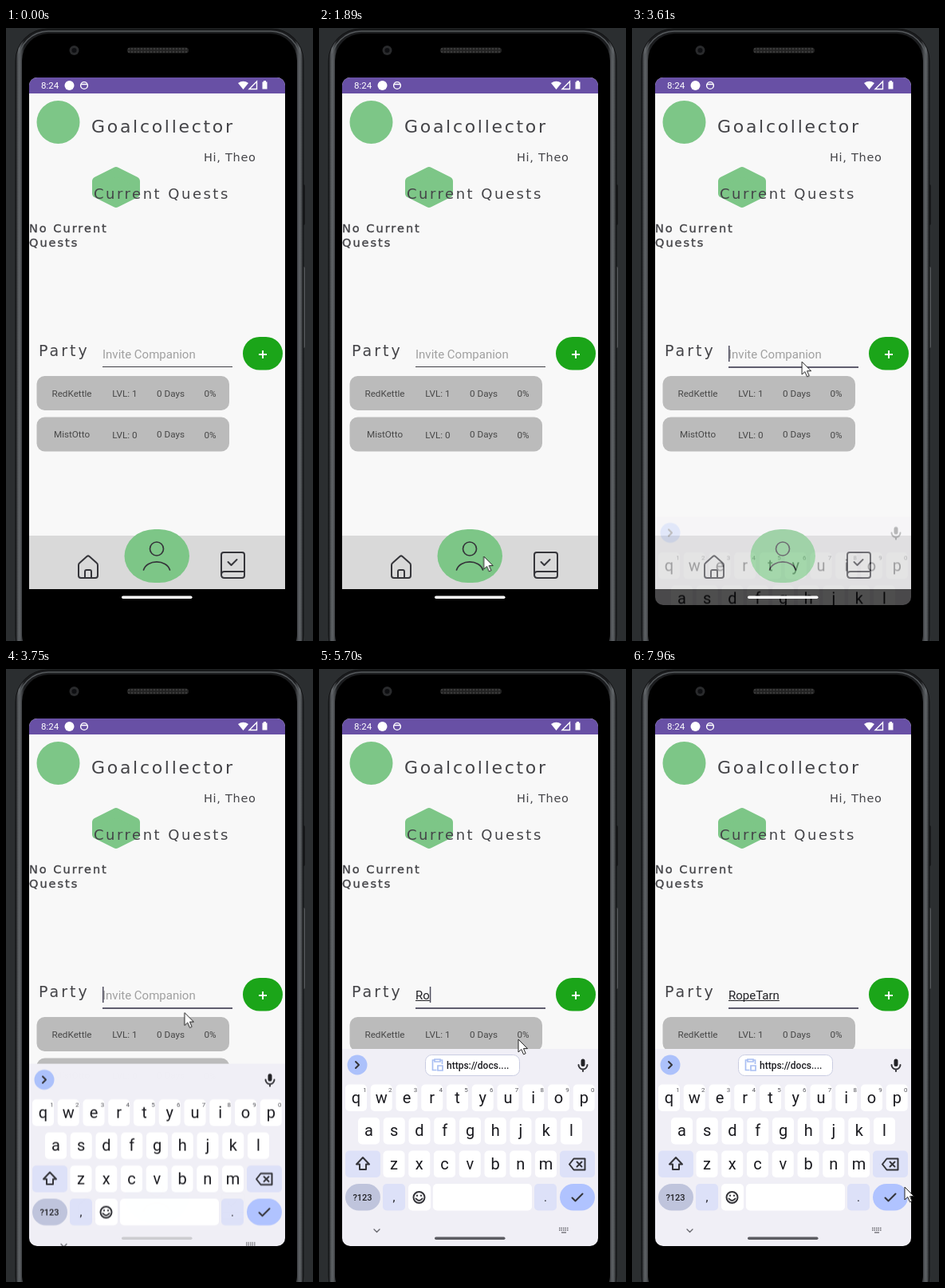
An HTML page for the animation above (8 s loop, 385 by 768 pixels).

```html
<!DOCTYPE html>
<html lang="en">
<head>
<meta charset="utf-8">
<title>Quest app</title>
<style>
html, body { margin: 0; width: 100%; height: 100%; overflow: hidden; background: #2b2e30; }
svg { display: block; width: 100%; height: 100%; }
text { font-family: Roboto, sans-serif; }
.wide text { font-family: "DejaVu Sans", sans-serif; fill: #444448; }
.row text { font-size: 11.7px; fill: #484848; text-anchor: middle; }
.icon { fill: none; stroke: #35353a; stroke-width: 2; stroke-linecap: round; stroke-linejoin: round; }
.letter { font-size: 20px; fill: #1b1b20; text-anchor: middle; }
.digit { font-size: 8px; fill: #55555c; text-anchor: middle; }
.anim { animation: 8s linear infinite; }
.step { animation: 8s step-end infinite; }

#pointer { animation-name: pointer; }
#press { animation-name: press; }
#keyboard { animation-name: slide; }
#chip { animation-name: chip; }
#handle { animation-name: handle; }
#field { animation-name: focus; }

@keyframes pointer {
  0%, 3.98% { opacity: 0; transform: translate(364px, 637px); }
  4% { opacity: 1; transform: translate(364px, 637px); }
  6.63%, 11% { transform: translate(361px, 277px); }
  13.2% { transform: translate(345px, 241px); }
  15.8% { transform: translate(301px, 400px); }
  17.75%, 20.2% { transform: translate(314px, 481px); }
  23.62% { transform: translate(207px, 662px); }
  26% { transform: translate(158px, 670px); }
  30.6%, 31% { transform: translate(181px, 454px); }
  35%, 41% { transform: translate(203px, 404px); }
  45.12% { transform: translate(213px, 418px); }
  49.5% { transform: translate(240px, 449px); }
  53%, 96% { transform: translate(250px, 464px); }
  99.5%, 100% { opacity: 1; transform: translate(342px, 649px); }
}
@keyframes press { 0%, 42% { opacity: 0; } 40.1% { opacity: 1; } }
@keyframes slide {
  0%, 43.3% { opacity: 0; transform: translateY(247px); }
  45.12% { opacity: .3; transform: translateY(138px); }
  46% { opacity: .75; transform: translateY(58px); }
  46.9% { opacity: 1; transform: translateY(18px); }
  48.6%, 100% { opacity: 1; transform: none; }
}
@keyframes chip { 0% { opacity: 0; } 48.6%, 100% { opacity: 1; } }
@keyframes handle {
  0%, 46% { fill: #fff; }
  47%, 57.3% { fill: #c5c5ca; }
  58.3%, 100% { fill: #5c5c62; }
}
@keyframes focus { 0% { height: 1px; fill: #3f3f45; } 42.5%, 100% { height: 2px; fill: #5f5d6e; } }
</style>
</head>
<body>
<svg viewBox="0 0 385 768" preserveAspectRatio="none">
  <defs>
    <clipPath id="screen"><rect x="29" y="62" width="321" height="661" rx="10"/></clipPath>
    <linearGradient id="rim">
      <stop offset="0" stop-color="#17181a"/><stop offset=".012" stop-color="#686c70"/>
      <stop offset=".03" stop-color="#1b1c1e"/><stop offset=".97" stop-color="#1b1c1e"/>
      <stop offset=".988" stop-color="#686c70"/><stop offset="1" stop-color="#17181a"/>
    </linearGradient>
    <pattern id="mesh" width="4" height="4" patternUnits="userSpaceOnUse">
      <rect width="4" height="4" fill="#222"/><circle cx="2" cy="2" r="1.2" fill="#3a3a3a"/>
    </pattern>
  </defs>

  <!-- Phone -->
  <rect width="385" height="768" fill="#2b2e30"/>
  <rect x="370" y="196" width="5" height="51" rx="2" fill="#17181a"/>
  <rect x="370" y="299" width="5" height="102" rx="2" fill="#55585b"/>
  <rect x="12" y="1" width="361" height="800" rx="40" fill="url(#rim)" stroke="#111213"/>
  <rect x="16" y="4" width="353" height="792" rx="37" fill="none" stroke="#55595c" stroke-width="1.5"/>
  <rect x="20" y="7" width="345" height="786" rx="34"/>
  <circle cx="85.500" cy="28" r="6" fill="#292a2c"/>
  <circle cx="85.500" cy="28" r="3" fill="#0e0f12"/>
  <rect x="152" y="24.500" width="77" height="7" rx="3.500" fill="url(#mesh)"/>

  <g clip-path="url(#screen)">
    <rect x="29" y="62" width="321" height="641" fill="#f8f8f8"/>
    <rect x="29" y="62" width="321" height="20" fill="#6850a5"/>
    <g fill="#fff">
      <text x="44" y="76" font-size="11.5">8:24</text>
      <circle cx="79.500" cy="72" r="6"/>
      <g fill="none" stroke="#fff" stroke-width="1.4">
        <circle cx="98" cy="72" r="4.400"/><path d="M94 70.500h8M305 76.500h9.500v-9.500z"/>
      </g>
      <path d="M291 69q6.500-4.500 13 0l-6.500 8zM321.500 67.500h1.500v-1.500h3v1.500h1.500v9h-6z"/>
    </g>

    <!-- Page -->
    <circle cx="65.500" cy="118" r="27" fill="#7dc687"/>
    <path d="M138 180l24 12v15l-24 12l-24-12v-15z" fill="#7dc687" stroke="#7dc687" stroke-width="12" stroke-linejoin="round"/>
    <g class="wide">
      <text x="107" y="131" font-size="22" letter-spacing="2.7">Goalcollector</text>
      <text x="248" y="167" font-size="14.5" letter-spacing=".7">Hi, Theo</text>
      <text x="110" y="214" font-size="18" letter-spacing="2.5">Current Quests</text>
      <g font-size="14.500" letter-spacing="2" stroke="#444448" stroke-width=".4">
        <text x="29" y="255.500">No Current</text>
        <text x="29" y="274">Quests</text>
      </g>
      <text x="41" y="411" font-size="19" letter-spacing="3">Party</text>
    </g>
    <text id="hint" x="121" y="414" font-size="15" fill="#a0a0a0">Invite Companion</text>
    <text id="typed" x="121" y="414" font-size="15" fill="#222226"></text>
    <rect id="mark" x="121" y="415" height="1" fill="#222226"/>
    <rect id="caret" y="398" width="1.500" height="20" fill="#4c4b5c"/>
    <rect id="field" class="step" x="121" y="424" width="163" height="1"/>
    <rect x="297" y="387" width="50" height="41.500" rx="21" fill="#1ba519"/>
    <path d="M317 409h10M322 404v10" stroke="#fff" stroke-width="2"/>
    <g id="rows"></g>

    <!-- Tabs -->
    <rect x="29" y="636" width="321" height="67" fill="#d9d9d9"/>
    <rect x="148.500" y="628" width="81.500" height="67" rx="38" ry="33.500" fill="#7dc687"/>
    <g class="icon">
      <path d="M91 673q0-2 1.500-3l9-8q1.500-1.200 3 0l9 8q1.500 1 1.500 3v13q0 3-3 3h-18q-3 0-3-3zM99 689v-8q0-2 2-2h4q2 0 2 2v8"/>
      <g stroke-width="1.700"><circle cx="189" cy="652.500" r="8.500"/><path d="M172.500 679c4-13.500 29-13.500 33 0"/></g>
      <path d="M270 685v-25q0-3 3-3h23q3 0 3 3v26q0 3-3 3h-22q-4 0-4-4t4-4h25M278.500 669l4 4 7-7"/>
    </g>
    <rect x="29" y="703" width="321" height="20"/>

    <!-- Keyboard -->
    <g id="keyboard" class="anim">
      <rect x="29" y="476" width="321" height="247" fill="#f0eff6"/>
      <circle cx="48" cy="496" r="12.500" fill="#acc1fb"/>
      <path class="icon" d="M46 492l4 4-4 4" stroke-width="1.700"/>
      <g id="chip" class="step">
        <rect x="133.500" y="483.500" width="118" height="26" rx="8" fill="#fff" stroke="#cacde2"/>
        <path d="M145 490h-2.500v12.500h5M152 490h2.500v5M145 489h7v3h-7zM149 497h6v6h-6z" fill="none" stroke="#a9bff2" stroke-width="1.700"/>
        <text x="160" y="501" font-size="12" font-weight="500" fill="#1b1b20">https://docs....</text>
      </g>
      <rect x="328.500" y="488.500" width="5" height="9.500" rx="2.500" fill="#222226"/>
      <path class="icon" d="M325.500 496a5.500 5.500 0 0 0 11 0M331 502v2" stroke-width="1.600"/>
      <g id="keys"></g>
      <g class="icon" stroke-width="1.700">
        <path d="M55 612l8 8.500h-4v6.500h-8v-6.500h-4zM314 620.500l5.500-7h14v14h-14zM323.500 617.500l6 6m0-6l-6 6"/>
        <circle cx="125.500" cy="662" r="7"/><path d="M121.500 663.500q4 5 8 0M123 659.500v.5M128 659.500v.5M317.500 662.500l4 4 9-9"/>
        <path d="M69 702l3.500 3.500 3.500-3.500" stroke="#66666c" stroke-width="1.300"/>
      </g>
      <path d="M301 700.500h12M301 703h12" stroke="#66666c" stroke-width="1.500" stroke-dasharray="1.500 1"/>
      <path d="M304 706h6" stroke="#66666c" stroke-width="1.300"/>
      <text x="54.500" y="666" font-size="11" font-weight="500" text-anchor="middle" fill="#222226">?123</text>
      <text class="letter" x="94" y="667" style="font-size:15px">,</text>
      <text class="letter" x="284" y="667" style="font-size:15px">.</text>
    </g>
    <rect id="handle" class="anim" x="145" y="711.500" width="88.500" height="3.500" rx="1.750"/>
  </g>

  <circle id="press" class="step" cx="203" cy="404" r="15" fill="#fbf34a" fill-opacity=".75"/>
  <path id="pointer" class="anim" d="M0 0v16l3.800-3.500 2.700 6.300 2.700-1.200-2.700-6h5z" fill="#fff" stroke="#222" stroke-linejoin="round"/>
</svg>
<script>
const $ = id => document.getElementById(id);

const key = (x, y, w, fill = '#fff', r = 5) =>
  `<rect x="${x}" y="${y}" width="${w}" height="33.500" rx="${r}" fill="${fill}"/>`;

const letterRow = (letters, firstX, y, digits = '') => [...letters].map((c, i) => {
  const x = firstX + i * 31.75;
  const digit = digits && `<text class="digit" x="${x + 11}" y="${y + 9}">${digits[i]}</text>`;
  return key(x - 13.5, y, 27) + `<text class="letter" x="${x}" y="${y + 23}">${c}</text>` + digit;
}).join('');

$('keys').innerHTML =
  letterRow('qwertyuiop', 46.5, 520.5, '1234567890') +
  letterRow('asdfghjkl', 62.5, 562) +
  letterRow('zxcvbnm', 94, 603.5) +
  key(33, 603.5, 44, '#dde1f8') + key(302, 603.5, 44, '#dde1f8') +
  key(33, 645, 44, '#bfc4dc', 17) + key(80, 645, 28, '#dde1f8') + key(112, 645, 28) +
  key(143, 645, 124) + key(270, 645, 28, '#dde1f8') + key(302, 645, 44, '#b0c3ff', 17);

const memberRow = (name, level, y) => `<g class="row" transform="translate(0 ${y})">
  <rect x="38.500" width="241.500" height="43" rx="10" fill="#bbb"/>
  <text x="82.500" y="25.500">${name}</text><text x="149" y="26">LVL: ${level}</text>
  <text x="206.500" y="25.500">0 Days</text><text x="256" y="26">0%</text></g>`;
$('rows').innerHTML = memberRow('RedKettle', 1, 436) + memberRow('MistOtto', 0, 487.5);

const word = 'RopeTarn';
const typedAt = [5350, 5630, 5900, 6030, 6490, 6760, 6960, 7090];
const markedAt = [5490, 5700, 6030, 6290, 6560, 6760, 6960, 7350];
const caretOn = [[3400, 3890], [4380, 4860], [5350, 7820]];
const typed = $('typed');
const show = (el, on) => el.setAttribute('visibility', on ? 'visible' : 'hidden');
let start;

function draw(now) {
  start ??= now;
  const t = (now - start) % 8000;
  const passed = times => times.filter(at => t >= at).length;
  const count = passed(typedAt), marked = passed(markedAt);
  typed.textContent = word.slice(0, count);
  show($('hint'), !count);
  $('mark').setAttribute('width', marked ? typed.getSubStringLength(0, marked) : 0);
  $('caret').setAttribute('x', 121 + (count ? typed.getComputedTextLength() : 0));
  show($('caret'), caretOn.some(([from, to]) => t >= from && t < to));
  requestAnimationFrame(draw);
}
requestAnimationFrame(draw);
</script>
</body>
</html>
```
